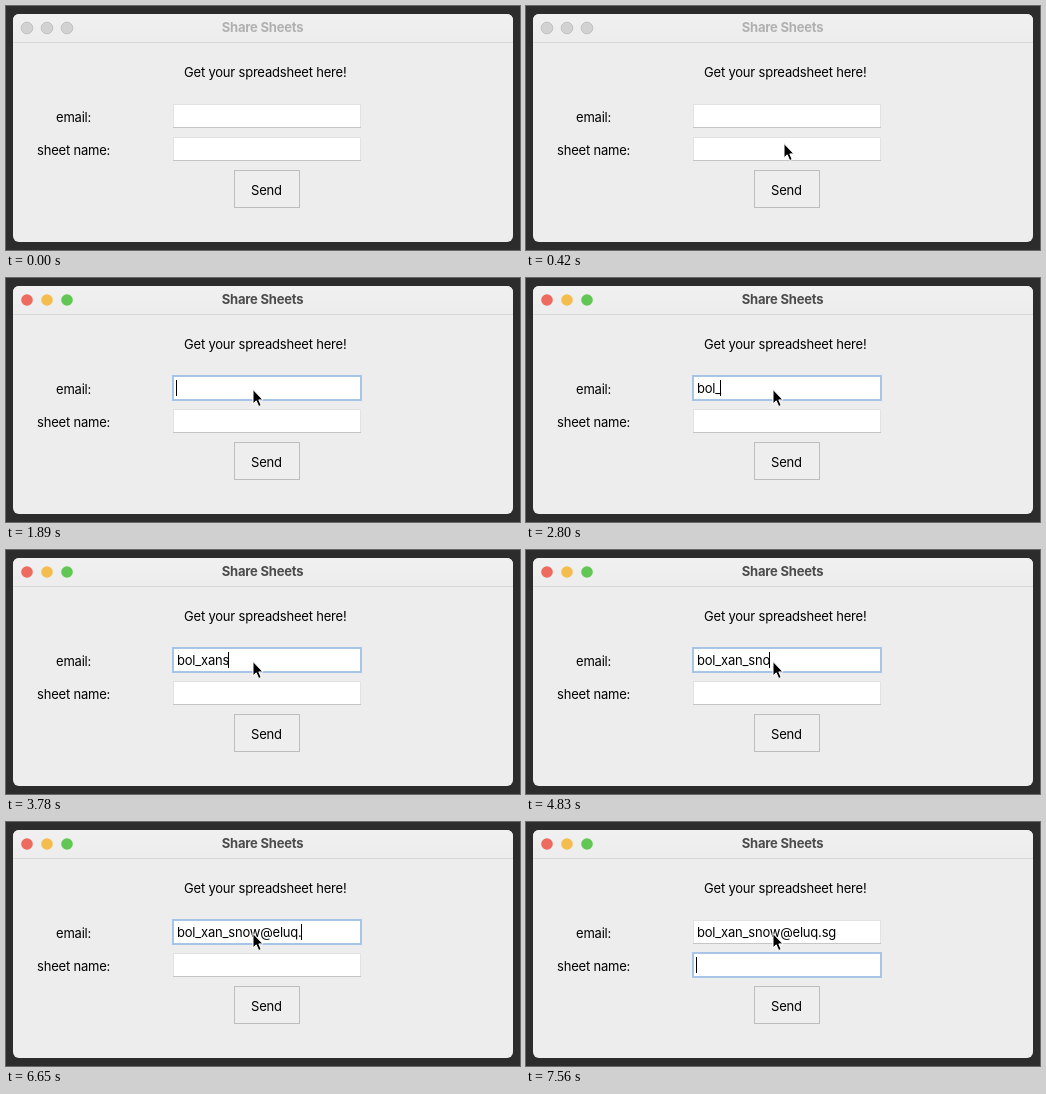
An HTML page for the animation above (8000 ms loop, 514 px wide and 244 px high).

```html
<!DOCTYPE html>
<html lang="en">
<head>
<meta charset="utf-8">
<title>Share Sheets</title>
<style>
html, body { margin: 0; width: 100%; height: 100%; overflow: hidden; background: #2d2c2d; }
svg { display: block; }
text { font: 13px Inter, "Liberation Sans", sans-serif; letter-spacing: -0.2px; fill: #000; white-space: pre; }
.title { font-weight: 700; text-anchor: middle; }
</style>
</head>
<body>
<svg width="514" height="244" viewBox="0 0 514 244">
  <defs>
    <linearGradient id="bar" x1="0" y1="0" x2="0" y2="1">
      <stop offset="0" stop-color="#f1f0f0"/><stop offset="1" stop-color="#eeeded"/>
    </linearGradient>
  </defs>
  <rect width="514" height="244" fill="#2d2c2d"/>
  <rect x="7" y="8" width="500" height="228" rx="6" fill="#ededed"/>
  <path d="M7 36V14a6 6 0 0 1 6-6H501a6 6 0 0 1 6 6V36Z" fill="url(#bar)"/>
  <path d="M7 36.5H507" stroke="#d9d9d9"/>
  <g id="lights"></g>
  <text id="title" class="title" x="256.5" y="26">Share Sheets</text>
  <text x="178" y="71">Get your spreadsheet here!</text>
  <text x="50" y="116">email:</text>
  <text x="31" y="149">sheet name:</text>
  <g id="fields"></g>
  <rect x="228.5" y="164.5" width="65" height="37" fill="#eeeeee" stroke="#bdbdbd"/>
  <text x="245" y="189">Send</text>
  <text id="entry" x="171" y="115"></text>
  <rect id="caret" width="1" height="16" fill="#000"/>
  <circle id="click" cx="247" cy="112.5" r="21.5" fill="none" stroke="#000" stroke-width="1.5"/>
  <path id="pointer" d="M0 0V14.3L3.2 11.3L5.7 17L8.2 15.9L5.8 10.4H10Z" fill="#000" stroke="#fff" stroke-width="1" stroke-linejoin="round"/>
</svg>
<script>
const LOOP = 8000, FOCUS = 840, TAB = 7560;
const $ = id => document.getElementById(id);
const show = (el, on) => el.setAttribute("visibility", on ? "visible" : "hidden");

function add(parent, tag, attrs) {
  const el = document.createElementNS("http://www.w3.org/2000/svg", tag);
  for (const k in attrs) el.setAttribute(k, attrs[k]);
  return parent.appendChild(el);
}

const lights = ["#ed6a5f", "#f4be4f", "#62c655"].map((color, i) =>
  ({ color, el: add($("lights"), "circle", { cx: 21 + 20 * i, cy: 22, r: 5.8 }) }));

const rings = [98, 131].map(y => {
  add($("fields"), "rect", { x: 167.5, y: y + .5, width: 187, height: 23, fill: "#fff", stroke: "#e2e2e2" });
  add($("fields"), "path", { d: `M167 ${y + 23.5}H355`, stroke: "#c6c6c6" });
  return add($("fields"), "rect", { x: 167, y, width: 188, height: 24, fill: "#fff", stroke: "#a8c4e6", "stroke-width": 2 });
});

// Typing: "<" removes the last character
const keys = "bol_xans<_snow@eluq.sg";
const keyTimes = [2030, 2170, 2310, 2520, 3080, 3220, 3360, 3640, 4060, 4410, 4550,
  4690, 4830, 5040, 5390, 5740, 5880, 6160, 6300, 6580, 6720, 6790];
const caretOff = [1540, 2450, 3430, 4410, 5320, 6230, 7210];
const caretOn = [1890, 2800, 3780, 4690, 5670, 6580, 7560];

// Pointer path: time, x, y
const path = [[70, 274, 243], [210, 267, 188], [420, 258, 137.5], [560, 251, 119], [700, 247, 111.5]];

function pointerAt(t) {
  const i = path.findIndex(p => p[0] > t);
  if (i < 0) return path[path.length - 1].slice(1);
  const [a, b] = [path[i - 1], path[i]];
  const k = (t - a[0]) / (b[0] - a[0]);
  return [a[1] + (b[1] - a[1]) * k, a[2] + (b[2] - a[2]) * k];
}

function typed(t) {
  let s = "";
  keyTimes.forEach((at, i) => {
    if (t >= at) s = keys[i] === "<" ? s.slice(0, -1) : s + keys[i];
  });
  return s;
}

function render(time) {
  const t = Math.floor(time % LOOP / 70 + 1e-6) * 70;
  const active = t >= FOCUS, second = t >= TAB;

  lights.forEach(({ el, color }) => {
    el.setAttribute("fill", active ? color : "#d3d2d2");
    el.setAttribute("stroke", active ? "none" : "#c2c1c1");
  });
  $("title").style.fill = active ? "#4b4b4b" : "#b1b0b0";
  show(rings[0], active && !second);
  show(rings[1], second);

  const s = typed(t);
  if ($("entry").textContent !== s) $("entry").textContent = s;
  const len = s && !second ? $("entry").getComputedTextLength() : 0;
  $("caret").setAttribute("x", Math.round(170 + len));
  $("caret").setAttribute("y", second ? 135 : 102);
  show($("caret"), active && !caretOff.some((off, i) => t >= off && t < caretOn[i]));

  show($("pointer"), t >= 70);
  if (t >= 70) $("pointer").setAttribute("transform", `translate(${pointerAt(t)})`);
  show($("click"), t >= 770 && t < 1050);
}

const start = performance.now();
function tick() {
  render(performance.now() - start);
  requestAnimationFrame(tick);
}
tick();
</script>
</body>
</html>
```
